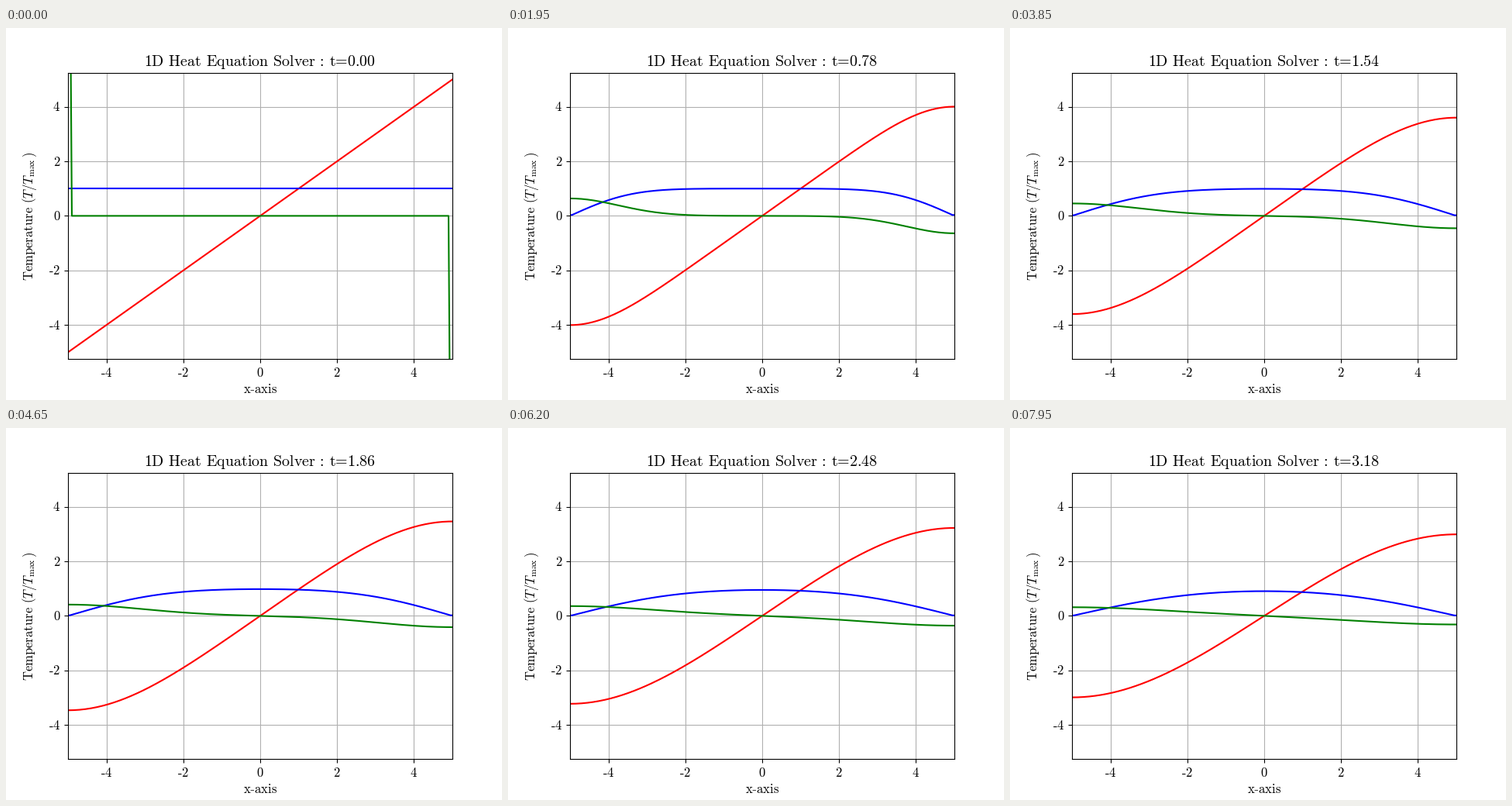
These frames come from a looping animation (640x480 px, 8 s). A matplotlib script:

```python
import numpy as np
import matplotlib.pyplot as plt
from matplotlib.animation import FuncAnimation

W, H, DPI = 640, 480, 100
FRAMES, STEP_MS, DT = 160, 50, 0.02
LENGTH, NODES = 10.0, 200

plt.rcParams.update({
    "font.family": "Liberation Serif",
    "font.size": 12,
    "mathtext.fontset": "cm",
})

x = np.linspace(-LENGTH / 2, LENGTH / 2, NODES)
dx = x[1] - x[0]

# Odd Fourier modes of the rod
n = np.arange(1, 400, 2)
k = n * np.pi / LENGTH
phase = np.outer(x + LENGTH / 2, k)
COS, SIN = np.cos(phase), np.sin(phase)


def profiles(t):
    """Insulated ramp, cooled plateau and the ramp's rate of change."""
    if t == 0:
        rate = np.zeros(NODES)
        rate[:2] = 1 / dx, 0.5 / dx
        return x, np.ones(NODES), rate - rate[::-1]
    decay = np.exp(-k**2 * t)
    ramp = -4 / LENGTH * COS @ (decay / k**2)
    plateau = 4 / np.pi * SIN @ (decay / n)
    plateau[0], plateau[-1] = plateau[1], plateau[-2]
    rate = 4 / LENGTH * COS @ decay
    return ramp, plateau, rate


def roman(words):
    return r"\hspace{0.38}".join(r"\text{%s}" % w for w in words.split())


def label(px, py, tex, **style):
    style = {"ha": "center", "va": "baseline", **style}
    return fig.text(px / W, 1 - py / H, tex, **style)


def title_text(t):
    return "$" + roman(f"1D Heat Equation Solver : t={t:.2f}") + "$"


fig = plt.figure(figsize=(W / DPI, H / DPI), dpi=DPI, facecolor="white")
ax = fig.add_axes([0.125, 0.11, 0.775, 0.77])
ax.set(xlim=(-5, 5), ylim=(-5.25, 5.25))
ax.grid(True)

ticks = [-4, -2, 0, 2, 4]
ax.set_xticks(ticks, [""] * 5)
ax.set_yticks(ticks, [""] * 5)
for v in ticks:
    tex = "$" + roman(str(v)) + "$"
    label(328 + 49.6 * v, 450, tex)
    label(70.3, 242.4 - 35.2 * v + 5.7, tex, ha="right")

label(328, 471, r"$\text{x}$-$\text{axis}$")
label(34.5, 242.4,
      "$" + roman("Temperature (") + r"T/T_{\text{max}}\,\text{)}$",
      rotation=90, rotation_mode="anchor")
title = label(328, 49.3, title_text(0), fontsize=14.4)

lines = [ax.plot(x, x, color, lw=1.5)[0] for color in "rbg"]


def update(frame):
    t = frame * DT
    for line, y in zip(lines, profiles(t)):
        line.set_ydata(y)
    title.set_text(title_text(t))
    return [*lines, title]


anim = FuncAnimation(fig, update, frames=FRAMES, interval=STEP_MS,
                     repeat=True, repeat_delay=0, blit=False)
plt.show()
```
